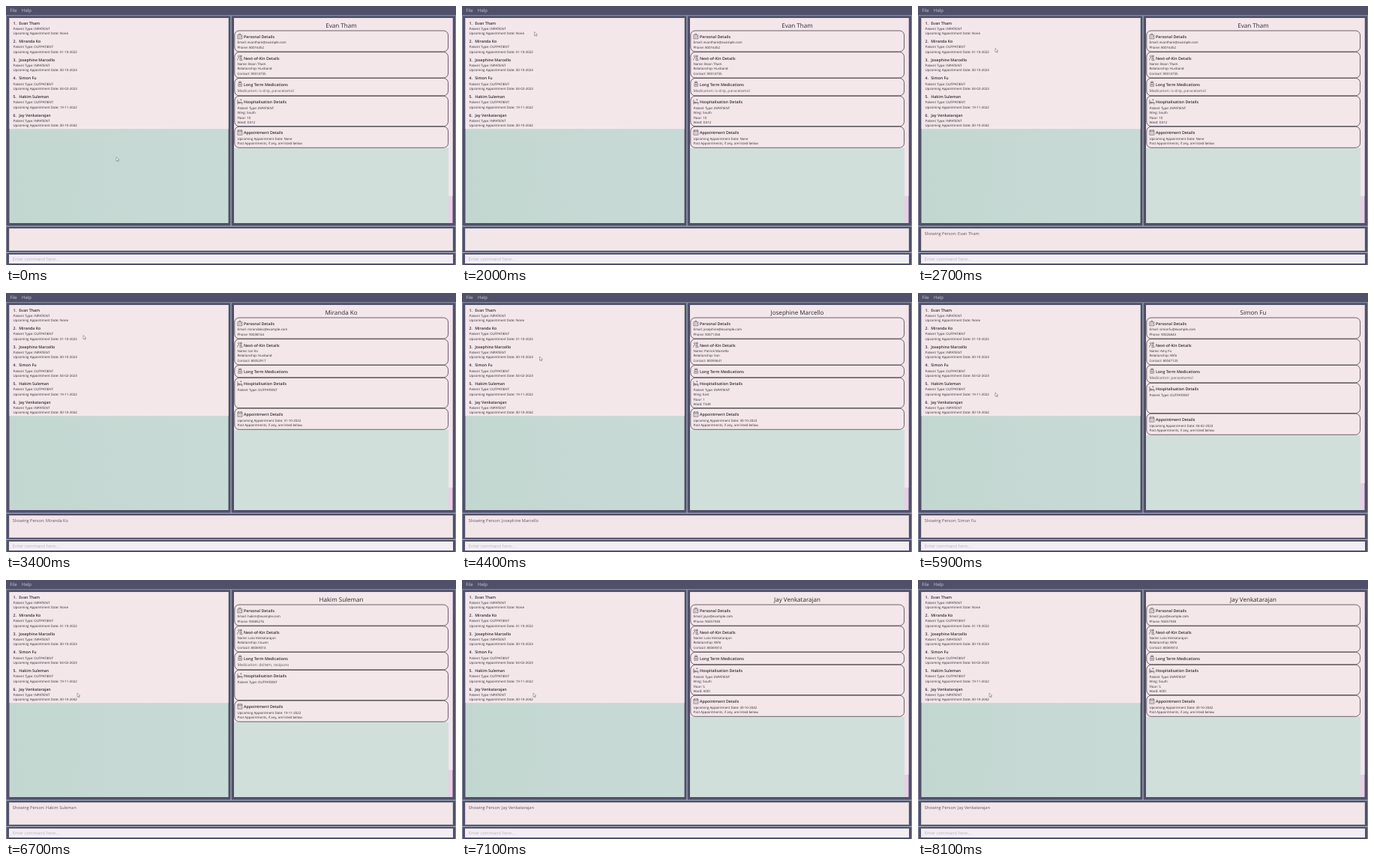
An HTML page for the animation above (8.2 s loop, 600x346 px).

```html
<!DOCTYPE html>
<html lang="en">
<head>
<meta charset="utf-8">
<title>Patient list</title>
<style>
  html, body { margin: 0; width: 100%; height: 100%; overflow: hidden; background: #50506a; }
  svg { display: block; }
  text { font-family: "Open Sans", "Noto Sans", sans-serif; text-rendering: geometricPrecision; white-space: pre; }
</style>
</head>
<body>
<svg id="stage" width="600" height="346" viewBox="0 0 600 346"></svg>
<script>
const LOOP = 8200, STEP = 100;
const DARK = '#50506a', PINK = '#f4e7ea', INK = '#2b2930';

// name, mail, phone, kin, relationship, kin phone, medication, type, ward, date
const people = [
  ['Evan Tham', 'evantham', '80016452', 'Boon Tham', 'Husband', '90014735', 'iv drip, paracetamol', 'IN', ['South', '10', 'D312'], 'None'],
  ['Miranda Ko', 'mirandako', '90038164', 'Ian Ko', 'Husband', '80052917', '', 'OUT', null, '31-10-2022'],
  ['Josephine Marcello', 'josephine', '90071358', 'Patrick Marcello', 'Son', '80093641', '', 'IN', ['East', '1', 'T349'], '30-10-2023'],
  ['Simon Fu', 'simonfu', '90026843', 'Amy Fu', 'Wife', '80047125', 'paracetamol', 'OUT', null, '04-02-2023'],
  ['Hakim Suleman', 'hakim', '90085276', 'Lata Venkatarajan', 'Cousin', '80069314', 'doltem, ravipuno', 'OUT', null, '19-11-2022'],
  ['Jay Venkatarajan', 'jayv', '90057938', 'Lata Venkatarajan', 'Wife', '80069314', '', 'IN', ['South', '5', 'A001'], '30-10-2042']
].map(([name, mail, phone, kin, rel, kinPhone, med, type, ward, date]) =>
  ({ name, mail, phone, kin, rel, kinPhone, med, type: type + 'PATIENT', ward, date }));

// Highlight start and end for each row; the person is shown at the end.
const presses = [[2100, 2400], [3000, 3400], [3900, 4200], [5100, 5500], [6000, 6300], [6800, 7100]];

// time, x, y of the pointer
const path = [
  [0, 147, 202], [1100, 147, 202], [2000, 96.5, 34.5], [2400, 96.5, 34.5],
  [2700, 103, 56.5], [3400, 103, 56.5], [3900, 103.5, 85], [4400, 103.5, 85],
  [4900, 105.5, 109.5], [5500, 105.5, 109.5], [5900, 103, 133], [6300, 103, 133],
  [6700, 95, 151], [LOOP, 95, 151]
];

const icons = [
  'M.5 2.2h6v5h-6zM2.5 2.2v-1.6h2v1.6M1.5 5.8q1-1.6 2 0M2.5 3.4v.8M4.4 4h1.3M4.4 5.4h1.3',
  'M2 1.2a1 1 0 1 0 .1 0zM.5 7.5v-2.4q1.5-2 3 0M5 3.4a.8.8 0 1 0 .1 0zM3.6 7.5q0-2.3 1.5-2.3t1.6 2.3zM4 1h2v1.3h-2z',
  'M2.3 1h3v1.3h-3zM1.5 3.2q.8-.9 2.3-.9t2.3.9v4h-4.6zM2 5h3.5M3.8 3.9v2.2',
  'M.6 1v6.5M.6 5.8h6v1.7M6.6 5.8v-1.3h-3.6v1.3M1.8 3.8a.8.8 0 1 0 .1 0zM4 1.3h2M5 .4v1.8',
  'M.6 1.2h6v6.3h-6zM.6 2.9h6M2 .4v1.5M5.2 .4v1.5M2 4.3h1M4.2 4.3h1M2 6h1M4.2 6h1'
];

const rect = (x, y, r, b, fill, extra = '') =>
  `<rect x="${x}" y="${y}" width="${r - x}" height="${b - y}" fill="${fill}" ${extra}/>`;
const text = (x, y, size, s, fill = INK, extra = '') =>
  `<text x="${x}" y="${y}" font-size="${size}" fill="${fill}" ${extra}>${s}</text>`;
const bold = (x, y, s) => text(x, y, 5.25, s, INK, 'font-weight="600"');

function list(active) {
  let out = rect(4.5, 16, 296.5, 290, 'url(#teal)');
  out += rect(4.5, 16, 296.5, active < 0 ? 164.2 : 165.2, PINK);
  people.forEach((p, i) => {
    const on = i === active;
    const top = 16 + 24.65 * i + (active >= 0 && i > active ? 1 : 0);
    const dx = on ? .8 : 0, dy = on ? .6 : 0;
    if (on) out += rect(4.5, top, 296.5, top + 25.6, '#d8b3de') + rect(4.5, top, 296.5, top + .6, '#dcb993');
    out += `<g transform="translate(${dx} ${top + dy})">` +
      bold(9.6, 8.5, (i + 1) + '.') + bold(17.2, 8.5, p.name) +
      text(9.5, 15.6, 4.42, 'Patient Type: ' + p.type) +
      text(9.5, 22.1, 4.42, 'Upcoming Appointment Date: ' + p.date) + '</g>';
  });
  return out;
}

function details(p) {
  const shift = p.med ? 7 : 0;
  const cards = [
    [33, 61, 'Personal Details', [`Email: ${p.mail}@example.com`, 'Phone: ' + p.phone]],
    [61.6, 96, 'Next-of-Kin Details', ['Name: ' + p.kin, 'Relationship: ' + p.rel, 'Contact: ' + p.kinPhone]],
    [96.5, 112.8 + shift, 'Long Term Medications', []],
    [113.4 + shift, 153.6 + shift, 'Hospitalisation Details', ['Patient Type: ' + p.type,
      ...(p.ward ? ['Wing: ', 'Floor: ', 'Ward: '].map((k, i) => k + p.ward[i]) : [])]],
    [154.2 + shift, 182.3 + shift, 'Appointment Details',
      ['Upcoming Appointment Date: ' + p.date, 'Past Appointments, if any, are listed below.']]
  ];
  const thumb = p.med ? 254 : 260;
  let out = rect(304, 16, 590, 290, '#d0dfda') + rect(304, 16, 590, 183 + shift, PINK) +
    rect(590, 16, 595.5, 290, '#e9cde5') + rect(590, 16, 595.5, thumb, '#f3e4ec') +
    text(447, 28.8, 8.05, p.name, INK, 'text-anchor="middle"');
  cards.forEach(([top, bottom, title, lines], i) => {
    out += rect(304.8, top, 589.5, bottom, '#f4e7e9', 'rx="6" stroke="#3a363d" stroke-width=".75"') +
      `<path d="${icons[i]}" transform="translate(308.3 ${top + 3.6})" fill="none" stroke="#49454c" stroke-width=".55"/>` +
      bold(317, top + 10, title) +
      lines.map((s, n) => text(308.5, top + 17.3 + 6.5 * n, 4.38, s)).join('');
  });
  if (p.med) out += text(308.5, 115.2, 5.04, 'Medication: ' + p.med, '#5c565e');
  return out;
}

function pointer(t) {
  const k = path.findIndex(q => q[0] > t);
  const [t0, x0, y0] = path[k - 1], [t1, x1, y1] = path[k];
  const u = (t - t0) / (t1 - t0), e = u * u * (3 - 2 * u);
  return `<path d="M0 0v5.2l1.3-1.1.9 1.9.9-.4-.9-1.9h1.8z" fill="#fff" stroke="#77707c" stroke-width=".6"
    transform="translate(${x0 + (x1 - x0) * e} ${y0 + (y1 - y0) * e})"/>`;
}

function draw(t) {
  const active = presses.findIndex(([a, b]) => t >= a && t < b);
  const shown = presses.filter(([, b]) => t >= b).length - 1;
  const person = people[Math.max(shown, 0)];
  return '<defs><linearGradient id="teal"><stop stop-color="#c3d7d1"/><stop offset="1" stop-color="#c8dad5"/></linearGradient></defs>' +
    rect(0, 0, 600, 346, '#a7acb9') +
    rect(0, 0, 600, 12.4, DARK) +
    text(5.2, 8.2, 6, 'File', '#cbc9d5') + text(21, 8.2, 6, 'Help', '#cbc9d5') +
    rect(.6, 13.2, 299.4, 293.6, DARK) + rect(300.6, 13.2, 599.4, 293.6, DARK) +
    list(active) + details(person) +
    rect(.6, 294.8, 599.4, 328.8, DARK) +
    rect(4, 297, 596, 327, '#c3ccd0') + rect(4.8, 297.8, 595.2, 326.2, '#f3e6e9') +
    (shown < 0 ? '' : text(8.8, 305.8, 5.55, 'Showing Person: ' + person.name, '#5a555e')) +
    rect(.6, 330, 599.4, 346, DARK) + rect(4, 332, 596, 344, '#f3edf4') +
    text(8.8, 340, 5.8, 'Enter command here...', '#b9b3bb') +
    pointer(t);
}

const stage = document.getElementById('stage');
const start = performance.now();
let last = -1;
function tick() {
  const t = Math.floor((performance.now() - start) % LOOP / STEP) * STEP;
  if (t !== last) stage.innerHTML = draw(last = t);
  requestAnimationFrame(tick);
}
tick();
</script>
</body>
</html>
```
